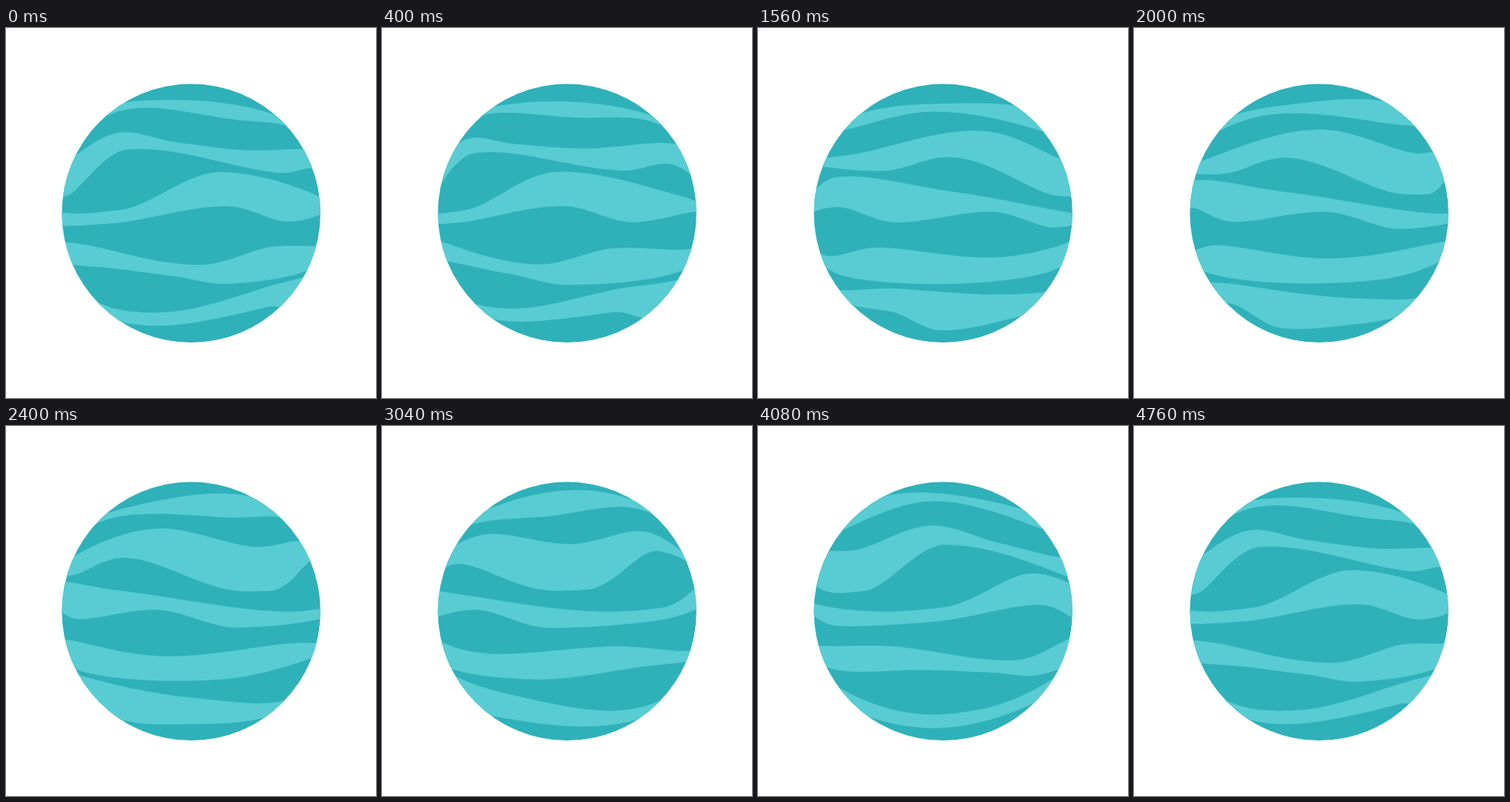
Animation, 480 px wide and 480 px high, one loop 4800 ms. Source, as an HTML page:

```html
<!DOCTYPE html>
<html lang="en">
<head>
<meta charset="utf-8">
<title>Planet</title>
<style>
  html, body { margin: 0; width: 100%; height: 100%; overflow: hidden; background: #fff; }
  svg { display: block; width: 100%; height: 100%; }
</style>
</head>
<body>
<svg viewBox="0 0 480 480">
  <clipPath id="disc"><circle cx="240.2" cy="240.2" r="167.7"/></clipPath>
  <circle cx="240.2" cy="240.2" r="167.7" fill="#2fb1ba"/>
  <path id="bands" clip-path="url(#disc)" fill="#58ccd2"/>
</svg>
<script>
  const LOOP = 4800, FRAME = 40;
  const CENTER = 240.2;
  const BALL = 179;  // the visible disc is a cap of a slightly larger ball
  const SPAN = 200;  // degrees of pattern that pass in one loop

  // A wavy line through a few [longitude, latitude] crests and troughs:
  // level at each extreme, eased in between, repeating every SPAN degrees.
  function wave(...keys) {
    const n = keys.length;
    const key = i => {
      const turn = Math.floor(i / n), [x, y] = keys[i - turn * n];
      return [x + turn * SPAN, y];
    };
    const slope = i => {
      const [x0, y0] = key(i), [x1, y1] = key(i + 1);
      return (y1 - y0) / (x1 - x0);
    };
    const tangent = i => {
      const a = slope(i - 1), b = slope(i);
      return a * b > 0 ? 2 * a * b / (a + b) : 0;
    };
    return lon => {
      let i = Math.floor(lon / SPAN) * n - 1;
      while (key(i + 1)[0] <= lon) i++;
      const [x0, y0] = key(i), [x1, y1] = key(i + 1);
      const w = x1 - x0, t = (lon - x0) / w, s = 1 - t;
      return y0 + (y1 - y0) * t * t * (3 - 2 * t)
        + w * t * s * (tangent(i) * s - tangent(i + 1) * t);
    };
  }

  // Upper and lower edge of each band, from north to south.
  const bands = [
    [wave([62, -52.5], [138, -61.7], [195, -55.2]),
     wave([22, -43.9], [58, -47.4], [114, -43.5], [164, -52.9])],
    [wave([22, -28], [84, -37.3], [128, -29.1], [165, -38.4], [195, -30.7]),
     wave([40, -18.5], [67, -24], [122, -8.5], [135, -9], [171, -28.8])],
    [wave([13, -17.5], [70, -8.8], [145, 0.2], [170, -1.6]),
     wave([15, -2.9], [45, 3.9], [85, -0.6], [119.5, 7], [165, 4.5])],
    [wave([4, 22], [38, 15], [88, 19.2], [145, 15.1]),
     wave([16, 31.3], [112, 30], [164, 25.3], [192, 27.2])],
    [wave([47, 34], [100, 38.8], [162, 48.7], [187, 46.4]),
     wave([39, 47.5], [64, 58.2], [100, 55], [160, 58.2])]
  ];

  // Wraps the flat pattern round the ball.
  function project(u, v) {
    const ang = Math.hypot(u, v) || 1e-6;
    const k = BALL * Math.sin(Math.min(ang, 90) * Math.PI / 180) / ang;
    return (CENTER + u * k).toFixed(2) + " " + (CENTER + v * k).toFixed(2);
  }

  function edge(line, shift) {
    const pts = [];
    for (let u = -80; u <= 80; u += 2) pts.push(project(u, line(u + shift)));
    return pts;
  }

  const path = document.getElementById("bands");

  function draw(ms) {
    const shift = SPAN * ms / LOOP;
    path.setAttribute("d", bands.map(([top, bottom]) =>
      "M" + edge(top, shift).concat(edge(bottom, shift).reverse()).join("L") + "Z").join(""));
  }

  const start = performance.now();
  function tick() {
    const ms = (performance.now() - start) % LOOP;
    draw(Math.floor(ms / FRAME) * FRAME);
    requestAnimationFrame(tick);
  }
  draw(0);
  requestAnimationFrame(tick);
</script>
</body>
</html>
```
